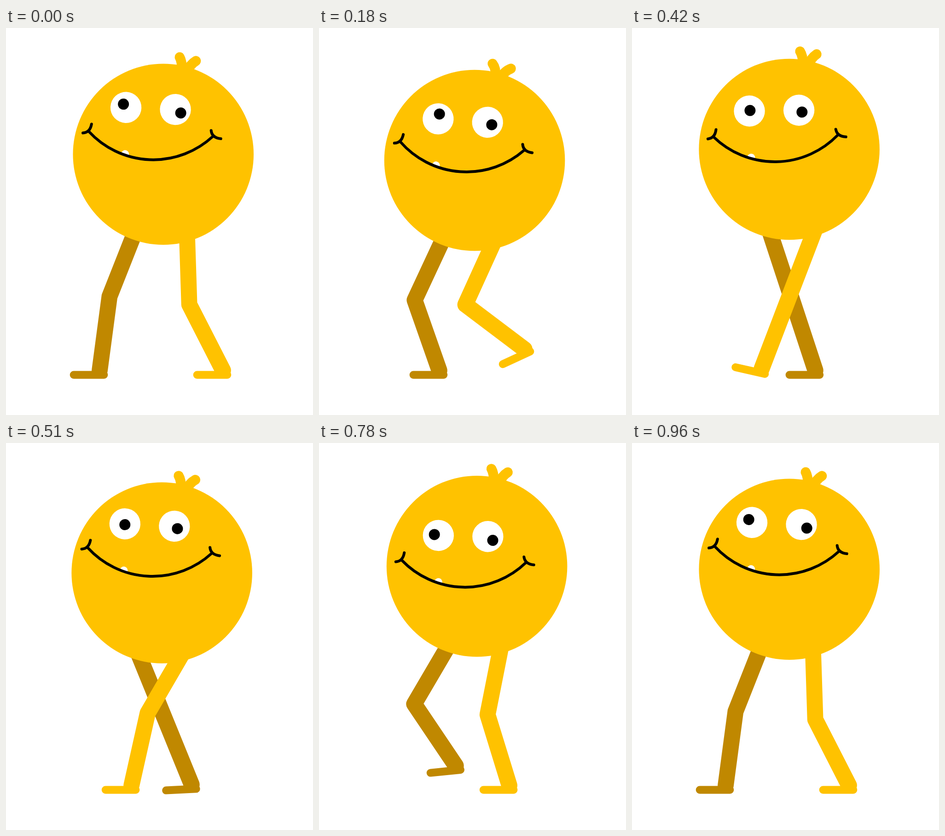
Write an HTML page with a canvas that moves like this. It is 667 px wide and 839 px high and loops after 990 ms.

```html
<!DOCTYPE html>
<html lang="en">
<head>
<meta charset="utf-8">
<title>Walking ball</title>
<style>
  html, body { margin: 0; width: 100%; height: 100%; overflow: hidden; background: #fff; }
  canvas { display: block; }
</style>
</head>
<body>
<canvas id="stage" width="667" height="839"></canvas>
<script>
const ctx = document.getElementById('stage').getContext('2d');
const { PI, sin, cos, max, sqrt, hypot } = Math;
const TAU = 2 * PI;
const LOOP = 990, STEP = 30, CYCLE = 960, HALF = CYCLE / 2;
const YELLOW = '#ffc200', BROWN = '#c08800';
const BODY_RADIUS = 196.3, LEG_WIDTH = 34.8, FOOT_WIDTH = 17, LINE = 6;
const GROUND = 742.5, STRIDE = 200;

// front: ankle at touchdown, peak: swing height, skew: how early the swing peaks
const farLeg = {
  color: BROWN, hip: [-50.9, 160.3], bone: 161.7,
  front: 203.5, delay: 0, peak: 50, skew: 1
};
const nearLeg = {
  color: YELLOW, hip: [57.9, 162.7], bone: 160.8,
  front: 271.5, delay: HALF, peak: 46.3, skew: 0.75
};

const rad = deg => deg * PI / 180;
const mix = (a, b, u) => a + (b - a) * u;

function ease(u) {
  const soft = u * u * (3 - 2 * u);
  const steep = u * u * u * (u * (6 * u - 15) + 10);
  return mix(soft, steep, 0.65);
}

function rotate([x, y], a) {
  const c = cos(a), s = sin(a);
  return [x * c - y * s, x * s + y * c];
}

function disc(x, y, r, color) {
  ctx.fillStyle = color;
  ctx.beginPath();
  ctx.arc(x, y, r, 0, TAU);
  ctx.fill();
}

function line(points, width) {
  ctx.lineWidth = width;
  ctx.beginPath();
  points.forEach(p => ctx.lineTo(...p));
  ctx.stroke();
}

function curve(from, ctrl, to, width) {
  ctx.lineWidth = width;
  ctx.beginPath();
  ctx.moveTo(...from);
  ctx.quadraticCurveTo(...ctrl, ...to);
  ctx.stroke();
}

// Two bobs per cycle, the second one slightly late, with a slow sway on top
function bodyPose(time) {
  const a = TAU * time / CYCLE;
  const late = rad(18) * max(0, cos(a - 0.83 * TAU)) ** 2;
  const bob = sin(2 * a - late), sway = cos(a + 0.7);
  return {
    x: 340.6 - 3.1 * bob + 1.2 * sway,
    y: 275 + 17 * bob,
    degrees: 1.97 + 3.1 * bob + 0.75 * sway,
    faceY: -84.4 + 19.4 * cos(2 * a - rad(225))
  };
}

function footPose(leg, time) {
  const t = (time + leg.delay) % CYCLE;
  const back = leg.front + STRIDE;
  if (t < HALF) {
    return { x: mix(leg.front, back, ease(t / HALF)), y: GROUND, angle: 0 };
  }
  const u = t / HALF - 1, swing = u ** 1.4;
  return {
    x: mix(back, leg.front, ease(swing)),
    y: GROUND - leg.peak * sin(PI * u ** leg.skew) ** 2,
    angle: rad(-19 * sin(TAU * swing) - 8 * sin(PI * swing))
  };
}

function drawLeg(leg, time, body) {
  const foot = footPose(leg, time);
  const [ox, oy] = rotate(leg.hip, rad(body.degrees));
  const hx = body.x + ox, hy = body.y + oy;
  const dx = foot.x - hx, dy = foot.y - hy, dist = hypot(dx, dy);
  const bend = sqrt(max(0, leg.bone ** 2 - dist ** 2 / 4));
  const knee = [hx + dx / 2 - dy / dist * bend, hy + dy / 2 + dx / dist * bend];
  ctx.strokeStyle = leg.color;
  line([[hx, hy], knee, [foot.x, foot.y]], LEG_WIDTH);
  const sole = [[-56.3, 9.6], [9.3, 9.6]].map(p => {
    const [x, y] = rotate(p, foot.angle);
    return [foot.x + x, foot.y + y];
  });
  line(sole, FOOT_WIDTH);
}

function drawHair(degrees) {
  const splay = max(0, degrees - 2.4) * 1.6;
  ctx.strokeStyle = YELLOW;
  curve([27 - splay, -211.8], [32.5, -203], [33.3, -184], 21.5);
  curve([62.7 + splay, -205.1 + splay / 2], [49.8, -196.8], [44.5, -180.5], 21.5);
}

function drawEye(x, pupilX, pupilY) {
  disc(x, 0, 33.7, '#fff');
  disc(x + pupilX, pupilY, 12, '#000');
}

function drawFace(a) {
  drawEye(-53.8,
    -2.5 + 6 * cos(a - rad(120)) + 1.3 * cos(2 * a - rad(100)),
    -4 - 6 * cos(a - rad(45)) + 1.3 * cos(2 * a + rad(15)));
  drawEye(53.8,
    9.3 + 2.7 * cos(a + rad(20)),
    6 + 2.2 * cos(a + rad(60)));

  ctx.fillStyle = '#fff';
  ctx.beginPath();
  ctx.arc(-51.6, 101, 8.5, PI + 0.29, TAU + 0.29);
  ctx.fill();

  ctx.strokeStyle = '#000';
  ctx.lineWidth = LINE;
  ctx.beginPath();
  ctx.arc(2.5, -79.7, 190.7, PI / 4, PI * 3 / 4);
  ctx.stroke();
  curve([-145, 59], [-129.5, 57.5], [-127, 39], LINE);
  curve([133.2, 42.5], [135.5, 58], [155, 59.4], LINE);
}

function draw(t) {
  const time = t % CYCLE, body = bodyPose(time);

  ctx.fillStyle = '#fff';
  ctx.fillRect(0, 0, 667, 839);
  ctx.lineCap = ctx.lineJoin = 'round';
  drawLeg(farLeg, time, body);
  drawLeg(nearLeg, time, body);
  disc(body.x, body.y, BODY_RADIUS, YELLOW);

  ctx.save();
  ctx.translate(body.x, body.y);
  ctx.rotate(rad(body.degrees));
  drawHair(body.degrees);
  ctx.translate(-31.4, body.faceY);
  drawFace(TAU * t / LOOP);
  ctx.restore();
}

const start = performance.now();
function tick() {
  const t = (performance.now() - start) % LOOP;
  draw(Math.floor(t / STEP) * STEP);
  requestAnimationFrame(tick);
}
tick();
</script>
</body>
</html>
```
